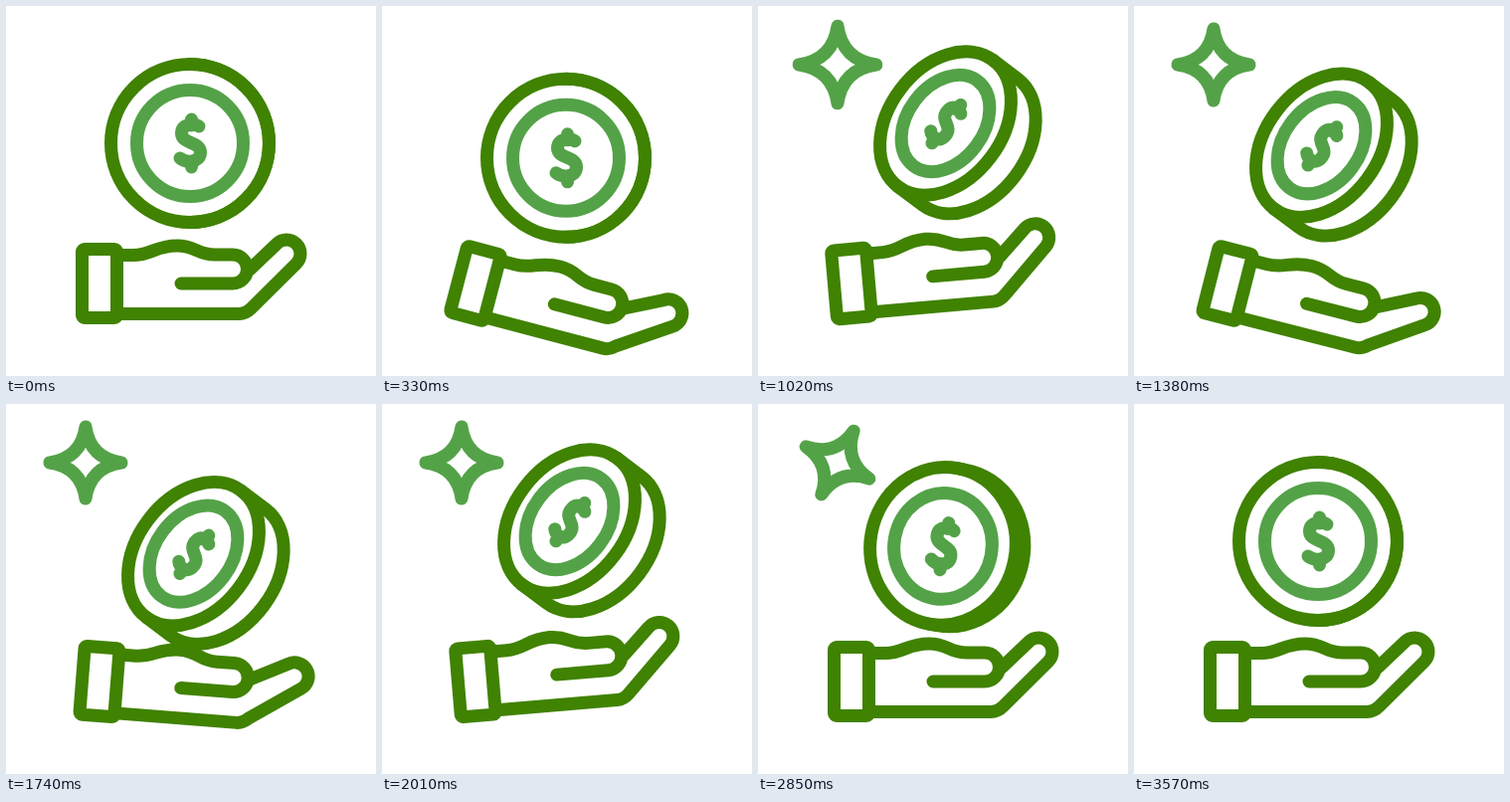
Write an HTML page that moves like this. It is 372x372 px and loops after 3.6 s.

```html
<!DOCTYPE html>
<html lang="en">
<head>
<meta charset="utf-8">
<title>Coin toss</title>
<style>
  html, body { margin: 0; width: 100%; height: 100%; overflow: hidden; background: #fff; }
  svg { display: block; width: 100vw; height: 100vh; }
  svg * { fill: none; stroke-width: 13; stroke-linecap: round; stroke-linejoin: round; }
  .dark { stroke: #408201; }
  .light { stroke: #54a248; }
</style>
</head>
<body>
<svg viewBox="0 0 372 372">
  <g id="hand" class="dark">
    <rect x="76.5" y="244.5" width="35" height="69" rx="2.5"/>
    <path d="M113 250.500H128C146 250.500 150 241 172 241C191 241 192 250 210 250H228A14.500 14.500 0 0 1 228 279H176"/>
    <path id="finger"/>
  </g>
  <g id="coin">
    <path id="edge" class="dark"/>
    <ellipse id="rim" class="dark" ry="79.5"/>
    <ellipse id="ring" class="light" ry="53.5"/>
    <path id="sign" class="light" vector-effect="non-scaling-stroke"
      d="M9 -17C4 -20.500 -8.500 -20 -8.500 -10C-8.500 1 10.500 -2 10.500 9C10.500 20 -4 20 -10 15M1.500 -24V-18M1.500 18V24"/>
  </g>
  <path id="star" class="light"/>
</svg>
<script>
const LOOP = 3600, TOSS = 1050, RAD = Math.PI / 180;
const $ = id => document.getElementById(id);
const set = (id, attrs) => {
  for (const k in attrs) $(id).setAttribute(k, attrs[k]);
};

// Eased step from 0 to 1 between two times.
function ramp(t, from, to) {
  const x = Math.min(1, Math.max(0, (t - from) / (to - from)));
  return x * x * (3 - 2 * x);
}

// Sums a motion over both tosses; each gets its own local time.
const tosses = (t, move) => move(t, 0) + move(t - TOSS, 1);

function drawHand(t) {
  const dips = tosses(t, u => ramp(u, 0, 400) - ramp(u, 485, 870));
  const recoil = ramp(t, 0, 400) - ramp(t, 1920, 2700);
  const bend = 13 * RAD * tosses(t, u => ramp(u, 0, 400) - ramp(u, 640, 910));
  const c = Math.cos(bend), s = Math.sin(bend);
  // Finger tip points swing about the base of the palm.
  const swing = (x, y) => `${240 + x * c - y * s} ${288 + x * s + y * c}`;
  set("hand", { transform: `rotate(${21 * dips - 5 * recoil} 94 279)` });
  set("finger", {
    d: `M245 265L${swing(32.1, -48.8)}A14 14 0 0 1 ${swing(51.9, -29)}L246.500 304Q241 309.500 234.500 309.500H113`
  });
}

function drawCoin(t) {
  const falls = tosses(t, (u, i) => (48 - 6 * i) * (ramp(u, 60, 580) - ramp(u, 580, 940)));
  const lift = 20 * ramp(t, 60, 580) - 25.5 * ramp(t, 2180, 2750) + 5.5 * ramp(t, 2750, 3240);
  const p = ramp(t, 540, 960) - 0.96 * ramp(t, 2420, 3060) - 0.04 * ramp(t, 3060, LOOP);
  const squash = 1 - 0.285 * p, rx = 79.5 * squash, depth = 31 * p;
  set("coin", { transform: `translate(${185 + 3.5 * p} ${138 + falls - lift}) rotate(${37 * p})` });
  set("rim", { rx });
  set("ring", { rx: 53.5 * squash });
  set("sign", { transform: `scale(${squash} 1)` });
  set("edge", { d: `M0 -79.500H${depth}A${rx} 79.500 0 0 1 ${depth} 79.500H0` });
}

function drawStar(t) {
  const leave = ramp(t, 2715, 3130);
  const grow = 42 * ramp(t, 650, 1095) - 6 * ramp(t, 1095, 1380) + 11.5 * ramp(t, 2400, 2715);
  const r = grow * (1 - leave), q = r * 0.122;
  set("star", {
    d: `M0 ${-r}Q${q} ${-q} ${r} 0Q${q} ${q} 0 ${r}Q${-q} ${q} ${-r} 0Q${-q} ${-q} 0 ${-r}Z`,
    transform: `translate(80 59) rotate(${108 * leave})`,
    visibility: t >= 600 && t < 3140 ? "visible" : "hidden"
  });
}

function draw(t) {
  drawHand(t);
  drawCoin(t);
  drawStar(t);
}

let start;
function tick(now) {
  start ??= now;
  draw((now - start) % LOOP);
  requestAnimationFrame(tick);
}
draw(0);
requestAnimationFrame(tick);
</script>
</body>
</html>
```
